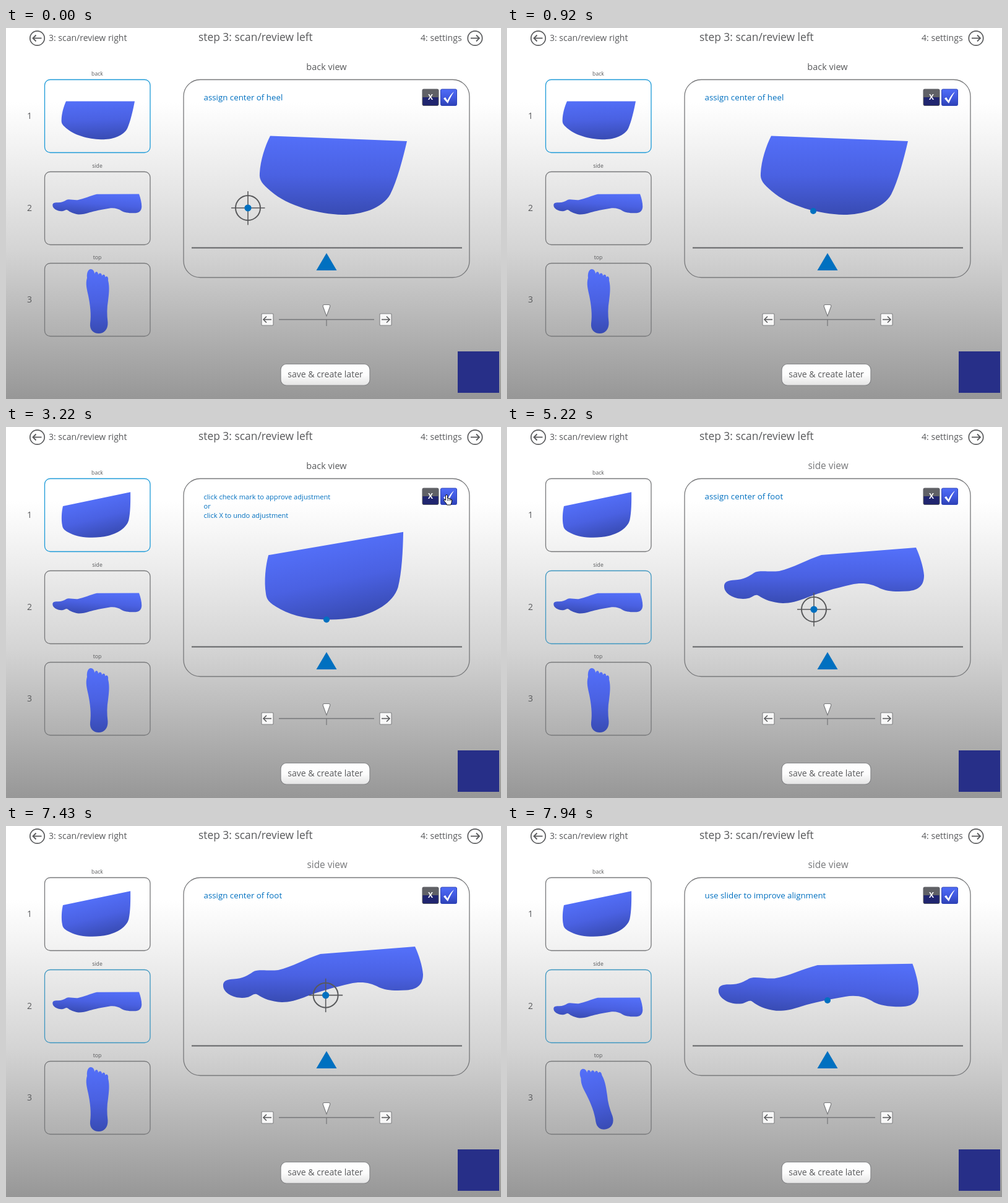
These frames come from a looping animation (800 px wide and 600 px high, 8000 ms). An HTML page with a canvas:

```html
<!DOCTYPE html>
<html lang="en">
<head>
<meta charset="utf-8">
<title>Scan review</title>
<style>
html, body { margin: 0; width: 100%; height: 100%; overflow: hidden; background: #fff; }
canvas { display: block; }
</style>
</head>
<body>
<canvas id="stage" width="800" height="600"></canvas>
<script>
const ctx = document.getElementById('stage').getContext('2d');
const LOOP = 8000, STEP = 70;
const GREY = '#58595b', BLUE = '#0070c0';

// Foot outlines, each with the vertical span of its shading
const HEEL = {
  path: new Path2D('M427 174.5 L648 183 C641 213 632 247 621 269 C608 292 575 302 544 302 ' +
    'C505 301 455 288 428 264 C414 252 409 246 410 235 C411 214 419 190 427 174.5Z'),
  top: 175, bottom: 302
};
const SIDE = {
  path: new Path2D('M351 259 C350 250 358 248 368 247.5 C382 247 392 241 399 236 C407 231 424 235 440 233 ' +
    'C462 228 486 214 508 207 L661 195 C667 208 673 226 674 240 C674 255 667 264 647 265.5 ' +
    'C625 267 612 265 603 261 C588 253 574 251 556 255 C530 261 505 268 487 275 ' +
    'C470 282 457 285 446 285 C428 284 416 279 407 273 C401 269 398 275 390 277 C373 281 352 272 351 259Z'),
  top: 200, bottom: 285
};
const SOLE = {
  path: new Path2D('M131 404 C130 396 133 390 137 390 C141 390 143 394 143 398 C144 393 149 393 149 399 ' +
    'C151 395 155 396 155 401 C157 397 161 399 160 403 C163 400 166 403 165 408 ' +
    'C168 420 166 432 165 441 C163 452 163 464 164.5 476 C165 488 158 494 150 494 ' +
    'C141 494 135 488 136 478 C138 464 136 447 133 433 C131 423 128 414 131 404Z'),
  top: 392, bottom: 494
};

function shade(y0, y1, ...colors) {
  const g = ctx.createLinearGradient(0, y0, 0, y1);
  colors.forEach((c, i) => g.addColorStop(i / (colors.length - 1), c));
  return g;
}

// Draws a foot so that its point (ax, ay) lands on (x, y)
function foot(shape, ax, ay, x = ax, y = ay, deg = 0, scale = 1) {
  ctx.save();
  ctx.translate(x, y);
  ctx.rotate(deg * Math.PI / 180);
  ctx.scale(scale, scale);
  ctx.translate(-ax, -ay);
  ctx.fillStyle = shade(shape.top, shape.bottom, '#536ff8', '#4a61e2', '#384bb3');
  ctx.fill(shape.path);
  ctx.restore();
}

function text(str, x, y, size, color = GREY, align = 'left', weight = 400) {
  ctx.font = `${weight} ${size}px "Open Sans", "Noto Sans", sans-serif`;
  ctx.textAlign = align;
  ctx.fillStyle = color;
  ctx.fillText(str, x, y);
}

function box(x, y, w, h, r, stroke, fill, width = 1.3) {
  ctx.beginPath();
  ctx.roundRect(x, y, w, h, r);
  if (fill) { ctx.fillStyle = fill; ctx.fill(); }
  if (stroke) { ctx.strokeStyle = stroke; ctx.lineWidth = width; ctx.stroke(); }
}

function line(color, width, ...pts) {
  ctx.beginPath();
  for (let i = 0; i < pts.length; i += 2) ctx.lineTo(pts[i], pts[i + 1]);
  ctx.strokeStyle = color;
  ctx.lineWidth = width;
  ctx.stroke();
}

function disc(x, y, r, fill) {
  ctx.beginPath();
  ctx.arc(x, y, r, 0, Math.PI * 2);
  if (fill) { ctx.fillStyle = fill; ctx.fill(); } else ctx.stroke();
}

function arrow(x, y, dir, half, head, width) {
  line(GREY, width, x - half, y, x + half, y);
  const tip = x + dir * half;
  line(GREY, width, tip - dir * head, y - head, tip, y, tip - dir * head, y + head);
}

function cross(x, y) {
  ctx.strokeStyle = GREY;
  ctx.lineWidth = 2;
  disc(x, y, 20);
  line(GREY, 1.6, x - 27, y, x + 27.5, y);
  line(GREY, 1.6, x, y - 27, x, y + 27.5);
}

// Crosshair walks to its goal in six equal steps, then only the dot is left
function marker(t, start, x0, y0, x1, y1) {
  const n = Math.max(0, Math.min(6, Math.floor((t - start) / STEP) + 1));
  const x = x0 + (x1 - x0) * n / 6, y = y0 + (y1 - y0) * n / 6;
  if (t < start + 6 * STEP) cross(x, y);
  disc(x, y, t < start + 6 * STEP ? 5.6 : 5, BLUE);
}

function frameArea() {
  ctx.fillStyle = shade(0, 600, '#fff', '#fff', '#eaeaea', '#d4d4d4', '#b5b5b5', '#979797');
  ctx.fillRect(0, 0, 800, 600);

  ctx.strokeStyle = GREY;
  ctx.lineWidth = 1.7;
  disc(50.5, 16.5, 11.7);
  disc(758, 16.5, 11.7);
  arrow(50.5, 16.5, -1, 7, 5, 1.8);
  arrow(758, 16.5, 1, 7, 5, 1.8);
  text('3: scan/review right', 69, 21, 14);
  text('step 3: scan/review left', 311, 21, 17.4);
  text('4: settings', 670, 21, 14.1);

  box(287, 83.5, 462, 320, 27, '#77787a');
  line('#636466', 1.8, 300, 355.5, 737, 355.5);
  ctx.fillStyle = BLUE;
  ctx.fill(new Path2D('M518 364 L534.5 392 L501.5 392Z'));
}

function controls() {
  box(673, 99, 26, 26.5, 2, '#55565c', '#20256f', 1);
  ctx.fillStyle = '#606166';
  ctx.fillRect(673, 99, 26, 13);
  text('X', 686, 116, 12, '#fff', 'center', 700);
  box(702.5, 99, 26, 26.5, 2, '#2f45b8', shade(99, 126, '#4f6cf6', '#4059e0', '#2c40b4'), 1);
  ctx.fillStyle = '#fff';
  ctx.fill(new Path2D('M707 114 L710 112 L713.4 117.3 C716.5 110.5 720 106 724 103 C720 109 717 115 714 122Z'));

  line('#747577', 1.6, 441, 471.5, 595, 471.5);
  line('#747577', 1.2, 518, 471, 518, 482);
  const knob = new Path2D('M514 447.5 L522 447.5 Q524.5 448 523.5 451 L518 466 L512.5 451 Q511.5 448 514 447.5Z');
  ctx.fillStyle = '#fff';
  ctx.fill(knob);
  ctx.strokeStyle = '#77787a';
  ctx.lineWidth = 1.1;
  ctx.stroke(knob);
  for (const [x, dir] of [[422.5, -1], [613.5, 1]]) {
    box(x - 9.5, 462, 19, 19, 1.5, '#808183', '#f8f8f8', 1.1);
    arrow(x, 471.5, dir, 6.5, 5, 1.6);
  }

  box(444, 543.5, 144, 34.5, 9, '#858688', shade(544, 578, '#fff', '#fcfcfc', '#e4e4e4'), 1.2);
  text('save & create later', 516, 565, 14.1, GREY, 'center');

  ctx.fillStyle = '#272f88';
  ctx.fillRect(730, 523, 67, 67);
}

function thumbs(t) {
  ['back', 'side', 'top'].forEach((name, i) => {
    const y = [83.5, 232.5, 380.5][i];
    const active = i === (t < 5220 ? 0 : 1);
    box(62.5, y, 170.5, 118, 9, active ? (i ? '#3d96c0' : '#1c9ad8') : '#77787a');
    text(name, 147.5, y - 7, 8.7, GREY, 'center');
    text(String(i + 1), 38, y + 63.5, 14, GREY, 'center');
  });
  if (t < 1020) foot(HEEL, 427, 174.5, 97, 118.5, -2.2, 0.502);
  else foot(HEEL, 427, 174.5, 92, 128, -14, 0.504);
  foot(SIDE, 661, 195, 215, t < 7740 ? 268.5 : 277.5, 4.2, 0.445);
  if (t < 7640) foot(SOLE, 143.5, 442.5);
  else foot(SOLE, 143.5, 442.5, 141.5, 442, -15);
}

function hand() {
  const p = new Path2D('M710.5 111.5 Q710.5 109.5 712 109.5 Q713.6 109.5 713.6 111.5 L713.6 115.5 ' +
    'Q715 114.3 716 116 Q717.5 115 718.5 117 Q720.7 116.5 720.7 119 L720 122.5 L718.8 126 L712.5 126 ' +
    'L711.5 123.5 L708 119.5 Q707.4 117.2 709.2 117.4 L710.5 118.6Z');
  ctx.fillStyle = '#fff';
  ctx.fill(p);
  ctx.strokeStyle = '#000';
  ctx.lineWidth = 1;
  ctx.stroke(p);
  for (const x of [713.6, 716, 718.4]) line('#000', 0.8, x, 116.5, x, 119.5);
}

function note(t) {
  const put = (s, y = 117, size = 13.3) => text(s, 319.5, y, size, BLUE);
  if (t < 1220) put('assign center of heel');
  else if (t < 3220 || t >= 7940) put('use slider to improve alignment');
  else if (t < 5220) {
    put('click check mark to approve adjustment', 117, 11.1);
    put('or', 132, 11.1);
    put('click X to undo adjustment', 146.5, 11.1);
  } else put('assign center of foot');
}

function mainView(t) {
  if (t < 5220) {
    text('back view', 518, 68, 14.5, GREY, 'center');
    if (t < 1020) {
      foot(HEEL, 495, 296);
      marker(t, 500, 391, 291, 495, 296);
    } else {
      foot(HEEL, 495, 296, 515.9, 312, -12);
      disc(518, 311.5, 5, BLUE);
    }
  } else {
    text('side view', 519, 68, 15.4, '#77787a', 'center');
    if (t < 7740) {
      foot(SIDE, 527, 263);
      marker(t, 7220, 496, 295, 527, 263);
    } else {
      foot(SIDE, 527, 263, 517.2, 282, 3.7);
      disc(518, 282, 5, BLUE);
    }
  }
}

function draw(t) {
  frameArea();
  thumbs(t);
  mainView(t);
  note(t);
  controls();
  if (t >= 3220 && t < 5220) hand();
}

const begin = performance.now();
function tick() {
  draw((performance.now() - begin) % LOOP);
  requestAnimationFrame(tick);
}
tick();
</script>
</body>
</html>
```
